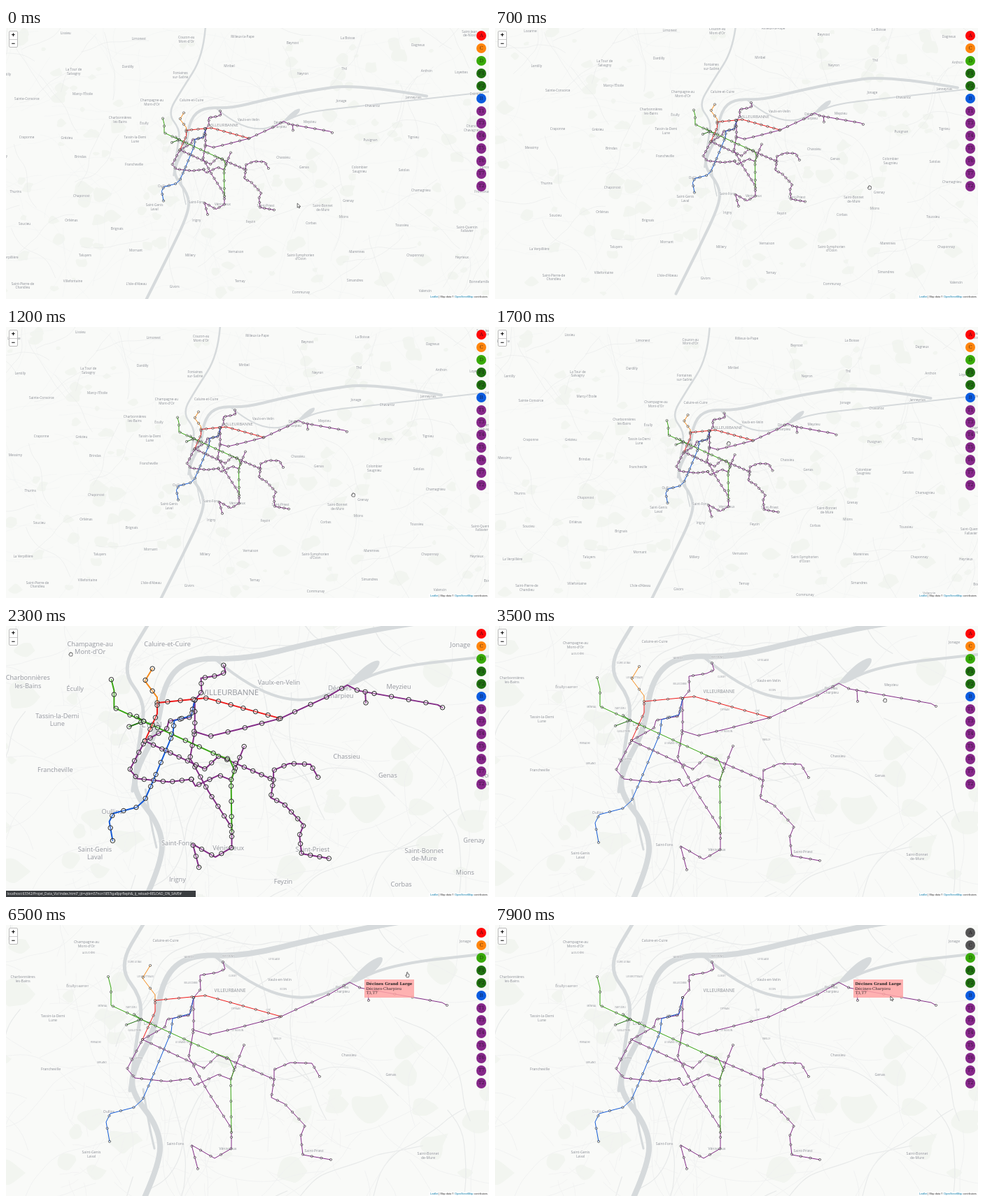
Animation of 690x388 px, one loop 8 s. Source, as an HTML page with a canvas:

```html
<!DOCTYPE html>
<html lang="fr">
<head>
<meta charset="utf-8">
<title>Transit map</title>
<style>
html, body { margin: 0; width: 690px; height: 388px; overflow: hidden; background: #ddd; }
#stage { position: relative; width: 690px; height: 388px; overflow: hidden; }
#stage > * { position: absolute; }
canvas { left: 0; top: 0; width: 690px; height: 388px; }
#zoom { left: 4px; top: 4px; width: 11px; height: 22px; background: #fff; border: .7px solid #bbb; border-radius: 2px;
  font: bold 9px/11px "Liberation Sans", sans-serif; text-align: center; }
#zoom div + div { border-top: .5px solid #ccc; }
.line { left: 672px; width: 14.4px; height: 14.4px; border-radius: 50%; color: rgba(20, 10, 20, .65);
  font: 7px/14.4px "DejaVu Serif", serif; text-align: center; }
#credit { right: 0; bottom: 0; padding: 0 2px; background: rgba(255, 255, 255, .7); color: #333;
  font: 3.75px/6px "Liberation Sans", sans-serif; white-space: nowrap; }
#credit span { color: #0078a8; }
#status { left: 0; top: 379px; width: 271px; height: 9px; background: #3a3d40; color: #e8e8e8;
  font: 4.9px/9px "Noto Sans", sans-serif; white-space: nowrap; text-indent: 1.5px; }
#tip { padding: 3px; background: rgba(255, 165, 165, .85); color: #3a2c30;
  font: 5.6px/6.6px "DejaVu Serif", serif; white-space: pre; }
#tip::first-line { font-weight: bold; color: #222; }
</style>
</head>
<body>
<div id="stage">
  <canvas id="map"></canvas>
  <div id="zoom"><div>+</div><div>−</div></div>
  <div id="credit"><span>Leaflet</span> | Map data © <span>OpenStreetMap</span> contributors</div>
  <div id="status">localhost:63342/Projet_Data_Viz/index.html?_ijt=vjtkm57ncn1857iga8jqrfleph&amp;_ij_reload=RELOAD_ON_SAVE#</div>
  <div id="tip"></div>
  <canvas id="pointer"></canvas>
</div>
<script>
const W = 690, H = 388, LOOP = 8000, DPR = window.devicePixelRatio || 1;
const $ = id => document.getElementById(id);
const context = id => {
  const c = $(id);
  c.width = W * DPR; c.height = H * DPR;
  return c.getContext('2d');
};
const map = context('map'), pointer = context('pointer');
const PURPLE = '#822a86', GREEN = '#36a510', DARK = '#1f7010', BLUE = '#1259d6';
let seed = 11;
const rand = (a, b) => a + (b - a) * ((seed = seed * 16807 % 2147483647) / 2147483647);
const clamp = v => Math.min(1, Math.max(0, v));
const repeat = (n, make) => Array.from({ length: n }, (_, i) => make(i));
const parse = s => s.split(' ').map(p => p.split(',').map(Number)).map(([x, y]) => ({ x, y }));

// Stations sit at even steps along a line, about one per gap.
function stationsOn(points, gap) {
  const legs = points.slice(1).map((b, i) => ({ a: points[i], b, length: Math.hypot(b.x - points[i].x, b.y - points[i].y) }));
  const total = legs.reduce((sum, leg) => sum + leg.length, 0), n = Math.round(total / gap);
  return repeat(n + 1, i => {
    let rest = total * i / n;
    const leg = legs.find(l => rest <= l.length + .01 || (rest -= l.length, false));
    const u = rest / leg.length;
    return { x: leg.a.x + (leg.b.x - leg.a.x) * u, y: leg.a.y + (leg.b.y - leg.a.y) * u };
  });
}
const line = (name, color, gap, path) => {
  const points = parse(path);
  return { name, color, points, stations: stationsOn(points, gap) };
};
const lines = [
  line('T4', PURPLE, 17, '268,104 268,150 261,189 288,238 322,291 322,320 298,334 265,315 274,349'),
  line('T1', PURPLE, 14, '310,53 313,63 302,68 277,72 278,92 268,104 262,129 230,135 227,146 195,164 173,206 184,219 230,224 263,220'),
  line('T6', PURPLE, 18, '263,220 269,230 303,214 321,221 326,207 340,172'),
  line('T2', PURPLE, 14, '195,164 270,199 283,205 303,186 383,221 379,247 398,256 427,287 421,302 424,329 464,336'),
  line('T5', PURPLE, 15, '383,221 383,207 406,197 437,198 448,217'),
  line('T3', PURPLE, 25.5, '267,150 290,157 332,147 393,131 464,98 491,82 506,90 623,111 630,115'),
  line('T7', PURPLE, 16, '517,92 518,108'),
  line('F1', DARK, 18, '172,143 193,135 206,141'),
  line('F2', DARK, 12, '183,128 193,135'),
  line('D', GREEN, 22, '146,74 150,90 150,115 206,141 302,185 319,191 326,207 321,222 322,297'),
  line('B', BLUE, 19, '268,104 263,127 238,134 236,153 209,218 195,250 183,261 149,270 143,282 148,310'),
  line('C', '#f58a1c', 17, '206,58 195,76 213,100 213,108'),
  line('A', '#f01818', 19, '195,164 213,124 213,108 285,101 393,131'),
];

const river = (width, path) => ({ width, points: parse(path) });
const rivers = [
  river(8, '900,10 700,-25 555,-4 440,20 340,45 262,42 224,75 213,150 185,200 177,237 218,289 222,340 160,470 95,600'),
  river(5, '268,-190 262,-105 198,-5 160,60 196,107 188,155 177,237'),
  river(4, '300,46 350,88 430,110 495,80 560,55 690,41 1100,-5'),
  river(3, '196,235 204,285 212,320'),
];
const lake = parse('490,82 512,56 538,43 538,55 518,74 500,82');

// Towns keep their place at both zoom levels.
const towns = `115 28 Champagne-au/Mont-d'Or|228 23 Caluire-et-Cuire|24 78 Charbonnières/les-Bains|93 88 Écully|67 134 Tassin-la-Demi/Lune|205 141 LYON
320 94 VILLEURBANNE|391 79 Vaulx-en-Velin|566 85 Meyzieu|480 93 Décines/Charpieu|656 24 Jonage|490 187 Chassieu|550 215 Genas|64 207 Francheville
147 268 Oullins|122 329 Saint-Genis/Laval|242 314 Saint-Fons|317 321 Vénissieux|440 324 Saint-Priest|603 331 Saint-Bonnet/de-Mure`
  .split(/[|\n]/).map(s => s.match(/(\S+) (\S+) (.+)/)).map(([, x, y, text]) => ({ x: +x, y: +y, text }));

// Names spread over the cells of a loose grid, outside the area to avoid.
function scatter(names, [left, top], [dx, dy], columns, avoid) {
  const list = names.split('|'), out = [];
  for (let i = 0; list.length; i++) {
    const x = left + i % columns * dx + rand(-.25, .25) * dx;
    const y = top + Math.floor(i / columns) * dy + rand(-.25, .25) * dy;
    if (!avoid(x, y)) out.push({ x, y, text: list.shift() });
  }
  return out;
}
const villages = scatter("Lozanne|Lissieu|Limonest|Couzon-au/Mont-d'Or|Rillieux-la-Pape|Beynost|La Boisse|Dagneux|Saint-Jean/de-Niost"
  + "|Lentilly|La Tour de/Salvagny|Dardilly|Fontaines/sur-Saône|Miribel|Neyron|Thil|Anthon|Loyettes|Sainte-Consorce|Marcy-l'Étoile"
  + "|Chavanoz|Janneyrias|Crémieu|Craponne|Grézieu|Pusignan|Tignieu|Charvieu/Chavagneux|Messimy|Brindas|Colombier/Saugnieu"
  + "|Satolas|Panossas|Thurins|Chaponost|Grenay|Chamagnieu|Frontonas|Soucieu|Orliénas|Brignais|Irigny|Feyzin|Corbas|Mions|Toussieu"
  + "|Saint-Quentin/Fallavier|La Verpillière|Taluyers|Mornant|Millery|Vernaison|Saint-Symphorien/d'Ozon|Marennes|Chaponnay|Heyrieux"
  + "|Saint-Pierre-de/Chandieu|Villefontaine|L'Isle-d'Abeau|Givors|Ternay|Communay|Simandres|Valencin|Bonnefamille",
  [-280, -150], [164, 88], 9, (x, y) => x > -20 && x < 650 && y > 0 && y < 360);
const districts = scatter('LA DUCHÈRE|CUIRE LE BAS|VASSIEUX|PETIT PONT|LE VILLAGE|CHAMPVERT|LES BROTTEAUX|BELLECOMBE|CUSSET|ECOIN'
  + '|MÉNIVAL|PART-DIEU|SANS SOUCI|CYPRIAN|CITÉ|PERRACHE|GUILLOTIÈRE|LE GRAND TROU|LE MOULIN|PARILLY|GERLAND|MINGUETTES',
  [125, 45], [65, 38], 5, () => false);

function wander(steps, size, turn, x, y) {
  let a = rand(0, 6.28);
  return repeat(steps, () => {
    a += rand(-turn, turn);
    return { x: x += Math.cos(a) * size, y: y += Math.sin(a) * size };
  });
}
const anywhere = () => [rand(-420, 1120), rand(-200, 620)];
const woods = repeat(150, () => {
  const [x, y] = anywhere(), r = rand(6, 28);
  return repeat(8, i => ({ x: x + Math.cos(i * .785) * r * rand(.5, 1.3), y: y + Math.sin(i * .785) * r * rand(.4, 1.1) }));
});
const roads = repeat(260, () => wander(10, 22, .4, ...anywhere()));
const streets = repeat(260, () => wander(4, 9, .3, rand(60, 480), rand(20, 370)));

// Keys are [time, x, y].
const cursorKeys = [[0, 416, 251], [300, 475, 240], [700, 535, 228], [1200, 496, 240], [1500, 496.5, 244.5],
  [2100, 10, 11], [2300, 92, 40], [3500, 557, 106], [5200, 518, 109], [5700, 507, 92],
  [6300, 520, 99], [6900, 679, 12], [7400, 679, 29], [7900, 565, 102]];
function cursorAt(t) {
  const i = cursorKeys.findIndex(k => k[0] > t), b = cursorKeys.at(i);
  if (i < 0) return b.slice(1);
  const a = cursorKeys[i - 1], u = (t - a[0]) / (b[0] - a[0]);
  return [1, 2].map(n => a[n] + (b[n] - a[n]) * u);
}
// The map follows the cursor while it is dragged.
function panAt(t) {
  const [x, y] = cursorAt(Math.min(1500, Math.max(300, t)));
  return [x - 475, y - 240];
}
// cubic-bezier(0, 0, .25, 1)
function zoomEase(x) {
  let lo = 0, hi = 1;
  for (let i = 0; i < 20; i++) {
    const s = (lo + hi) / 2;
    if (.75 * s * s + .25 * s ** 3 < x) lo = s; else hi = s;
  }
  return hi * hi * (3 - 2 * hi);
}

function trace(points, curved) {
  map.beginPath();
  points.forEach((p, i) => {
    const q = points[i + 1];
    if (!i) map.moveTo(p.x, p.y);
    else if (curved && q) map.quadraticCurveTo(p.x, p.y, (p.x + q.x) / 2, (p.y + q.y) / 2);
    else map.lineTo(p.x, p.y);
  });
}
function stroke(points, color, width, curved) {
  trace(points, curved);
  map.strokeStyle = color;
  map.lineWidth = width;
  map.stroke();
}
function fill(points, color) {
  trace(points, true);
  map.fillStyle = color;
  map.fill();
}
function drawLabels(labels, unit, alpha) {
  map.globalAlpha = alpha;
  map.fillStyle = '#8b8f94';
  map.strokeStyle = 'rgba(250,250,250,.7)';
  for (const { x, y, text } of labels) {
    const rows = text.split('/'), size = unit * (text === text.toUpperCase() ? 1.24 : 1);
    map.font = `${size}px "Open Sans", sans-serif`;
    map.lineWidth = size * .25;
    rows.forEach((row, i) => {
      const top = y + (i - (rows.length - 1) / 2) * size * 1.2;
      map.strokeText(row, x, top);
      map.fillText(row, x, top);
    });
  }
  map.globalAlpha = 1;
}

function drawMap(t) {
  const [px, py] = panAt(t), z = zoomEase(clamp((t - 2117) / 250));
  const k = .5 + .5 * z, blend = clamp((t - 2280) / 300);
  map.setTransform(DPR, 0, 0, DPR, 0, 0);
  map.fillStyle = '#f9faf8';
  map.fillRect(0, 0, W, H);
  map.translate((151 + px) * (1 - z), (92.5 + py) * (1 - z));
  map.scale(k, k);
  map.lineJoin = map.lineCap = 'round';
  map.textAlign = 'center';
  map.textBaseline = 'middle';

  woods.forEach(p => fill(p, '#f2f5f0'));
  streets.forEach(p => stroke(p, '#f1f2f2', .8));
  roads.forEach((p, i) => stroke(p, i % 4 ? '#f0f1f1' : '#e8eaea', i % 4 ? .9 : 1.2, true));
  rivers.forEach(r => stroke(r.points, '#d6dadc', r.width, true));
  fill(lake, '#d6dadc');
  drawLabels([...towns, ...villages], 9.4, 1 - blend);
  drawLabels(towns, 5.1, blend);
  drawLabels(districts, 2.5, blend);

  // Vector layers stretch with the view until the zoom settles.
  const unit = z < 1 ? 2 : 1;
  const shown = lines.filter(l => !hidden(l.name, t));
  shown.forEach(l => stroke(l.points, l.color, unit));
  map.strokeStyle = '#222';
  map.lineWidth = .5 * unit;
  map.fillStyle = 'rgba(255,255,255,.3)';
  for (const p of shown.flatMap(l => l.stations)) {
    map.beginPath();
    map.arc(p.x, p.y, 1.65 * unit, 0, 7);
    map.fill();
    map.stroke();
  }
  // Tiles not loaded yet beyond the left edge.
  map.setTransform(DPR, 0, 0, DPR, 0, 0);
  map.fillStyle = '#ddd';
  if (z === 0) map.fillRect(0, 0, Math.max(0, px - 21.5), H);
}

const arrow = new Path2D('M0 0V6.2L1.5 4.9L2.5 7L3.5 6.5L2.6 4.5H4.6Z');
const grab = new Path2D('M-1.3 3L-2.8 .6L-2.1 0L-1.4 .5V-1.6H-.5V-2.2H.5V-1.8H1.5V-1.2H2.5V1.5L2 3Z');
const finger = new Path2D('M-.7 2.5V-2Q0 -3 .7 -2V0L2.6 .6V3L2 5H-1L-2.6 2Q-1.6 1 -.7 2.5Z');
function drawPointer(t) {
  const [x, y] = cursorAt(t);
  const shape = t < 300 || t >= 7500 ? arrow : t < 1900 || t >= 2200 && t < 3700 ? grab : finger;
  pointer.setTransform(DPR, 0, 0, DPR, 0, 0);
  pointer.clearRect(0, 0, W, H);
  pointer.translate(x, y);
  pointer.fillStyle = '#fff';
  pointer.strokeStyle = '#111';
  pointer.lineWidth = .6;
  pointer.fill(shape);
  pointer.stroke(shape);
}

const hidden = (name, t) => name === 'A' && t >= 7000 || name === 'C' && t >= 7400;
const palette = { A: '#ff0808', C: '#ff850c', D: '#38aa08', F1: DARK, F2: DARK, B: '#0c5ce0' };
const buttons = 'A C D F1 F2 B T1 T3 T4 T5 T6 T7 T2'.split(' ').map((name, i) => {
  const el = document.createElement('div');
  el.className = 'line';
  el.textContent = name;
  el.style.top = 3.8 + i * 17.95 + 'px';
  $('stage').insertBefore(el, $('pointer'));
  return { name, el };
});

function showTip(t) {
  const tip = $('tip');
  tip.hidden = t < 3700;
  const [x, y, text] = t < 5700 ? [560.5, 86, 'Meyzieu Gare\nMeyzieu\nT3']
    : [511.5, 78, 'Décines Grand Large\nDécines-Charpieu\nT3,T7'];
  if (tip.textContent !== text) tip.textContent = text;
  tip.style.left = x + 'px';
  tip.style.top = y + 'px';
}

function render() {
  const t = performance.now() % LOOP;
  drawMap(t);
  drawPointer(t);
  showTip(t);
  $('status').hidden = t < 1980 || t > 2550;
  for (const { name, el } of buttons) el.style.background = hidden(name, t) ? '#555' : palette[name] || '#86288a';
  requestAnimationFrame(render);
}
render();
</script>
</body>
</html>
```
